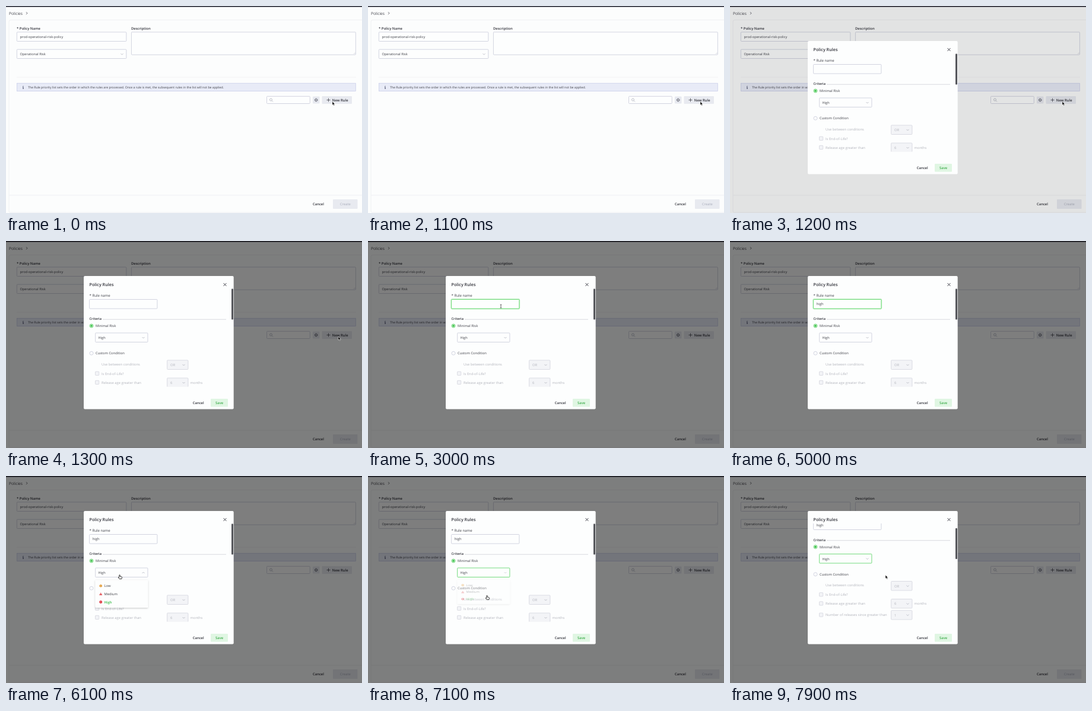
Recreate the animation shown at these times as an HTML page. Size 600x349 px, loop 8 s.

```html
<!DOCTYPE html>
<html lang="en">
<head>
<meta charset="utf-8">
<title>Policy rule form</title>
<style>
  html, body { margin: 0; width: 100%; height: 100%; overflow: hidden; background: #fcfdfd; }
  svg { display: block; width: 600px; height: 349px; }
  text { font: 5.65px "Open Sans", "Noto Sans", sans-serif; fill: #41424a; text-rendering: geometricPrecision; }
  .label { font-size: 5.9px; font-weight: 600; fill: #303139; }
  .option { font-size: 5.8px; font-weight: 500; }
  .off text { font-size: 5.8px; fill: #b3b5bd; }
  .box { fill: #fdfefe; stroke: #c8cbda; stroke-width: .8; }
  .off .box { fill: #f3f4f7; stroke: #d3d5de; }
  .line { fill: none; stroke: #c9cad3; stroke-width: .7; }
  .icon { fill: none; stroke: #44454e; stroke-width: .8; }
  .chevron { fill: none; stroke: #a6a9b5; stroke-width: .7; }
</style>
</head>
<body>
<svg viewBox="0 0 600 349">
  <defs>
    <path id="chevron" class="chevron" d="M-2-1 0 1 2-1"/>
    <clipPath id="view"><rect x="131" y="80" width="252" height="165.5"/></clipPath>
    <filter id="shadow" x="-20%" y="-20%" width="140%" height="150%">
      <feDropShadow dx="0" dy="1" stdDeviation="1.8" flood-opacity=".22"/>
    </filter>
  </defs>

  <g id="page">
    <rect width="600" height="349" fill="#fcfdfd"/>
    <rect width="600" height="1.5" fill="#171724"/>
    <text x="5" y="14.5" style="font-size:6.6px">Policies</text>
    <path class="icon" d="M34 10.2l2 2-2 2"/>
    <path d="M600 23.5H8q-3 0-3 3V346q0 2 2 2h593M5 319H600" fill="none" stroke="#eff0f3" stroke-width="1"/>
    <text class="label" x="18" y="39.7">* Policy Name</text>
    <text class="label" x="211" y="39.7">Description</text>
    <rect class="box" x="18.3" y="44" width="184.5" height="15.5" rx="1"/>
    <text x="23.5" y="53.8">prod-operational-risk-policy</text>
    <rect class="box" x="18.3" y="73.2" width="184.5" height="15.3" rx="1"/>
    <text x="23.5" y="83">Operational Risk</text>
    <use href="#chevron" x="195.5" y="81.2"/>
    <rect class="box" x="211.4" y="44" width="178" height="38.2" rx="1" style="width:378px"/>
    <path class="line" d="M586 81l2.500-2.500M588 81l.7-.7"/>
    <path d="M18 120H590" stroke="#eeeff2" stroke-width=".8"/>
    <rect x="18.3" y="130.200" width="571" height="13.300" fill="#e8ebf7" stroke="#c5cbe8" stroke-width=".7"/>
    <path d="M29 134.600v1M29 136.400v2.700M28 136.400h1M28 139.100h2" fill="none" stroke="#363a58" stroke-width=".8"/>
    <text x="37" y="138.900" style="font-size:5.15px">The Rule priority list sets the order in which the rules are processed. Once a rule is met, the subsequent rules in the list will not be applied.</text>
    <rect class="box" x="439.500" y="152.300" width="72.800" height="12.200" rx="1"/>
    <path class="chevron" d="M448 159.500l2 2M448.500 158a2 2 0 1 1-4 0a2 2 0 1 1 4 0"/>
    <rect x="517" y="152.500" width="11.500" height="12" rx="1" fill="#e7e9f0"/>
    <circle cx="522.700" cy="158.500" r="2.300" fill="none" stroke="#555864" stroke-width="1" stroke-dasharray="1.300 .5"/>
    <circle cx="522.700" cy="158.500" r="1.500" fill="none" stroke="#555864" stroke-width=".7"/>
    <rect x="532.500" y="152" width="50.500" height="13" rx="1" fill="#e8eaf0"/>
    <path class="icon" d="M540.500 158.500h6M543.500 155.500v6"/>
    <text class="label" x="549.800" y="160.600">New Rule</text>
    <text class="label" x="517" y="336">Cancel</text>
    <rect x="551" y="326" width="41.500" height="16" rx="1" fill="#e8eaf0"/>
    <text class="option" x="563" y="336" style="fill:#a9adbb">Create</text>
  </g>
  <rect id="shade" width="600" height="349"/>

  <g id="modal">
    <rect x="131" y="59" width="252.700" height="224.500" rx="2" fill="#fdfefe"/>
    <text class="label" x="140.500" y="76.400" style="font-size:7.2px">Policy Rules</text>
    <path class="icon" d="M366.500 71l5 5m0-5l-5 5" style="stroke-width:1"/>
    <g clip-path="url(#view)">
      <g id="content">
        <text class="option" x="140.500" y="94.200" style="font-size:6.100px">* Rule name</text>
        <rect id="glow" x="140" y="97.900" width="115.500" height="16.700" rx="1.500" fill="none" stroke="#bdf0c0" stroke-width="1.300"/>
        <rect id="field" class="box" x="140.600" y="98.500" width="114.300" height="15.500" rx="1"/>
        <text id="typed" x="145.700" y="108.200" style="font-size:5.800px"></text>
        <path id="caret" d="M0 103v7" stroke="#333" stroke-width=".6"/>
        <text class="label" x="140.500" y="133.300" style="font-size:5.700px">Criteria</text>
        <path class="line" d="M163 132.200H371"/>
        <circle cx="144" cy="143" r="3" fill="#d9f8da" stroke="#56cf61" stroke-width=".8"/>
        <circle cx="144" cy="143" r="1.700" fill="#36bd45"/>
        <text class="option" x="151" y="145.200">Minimal Risk</text>
        <rect id="select" class="box" x="150.600" y="155" width="88.300" height="15.500" rx="1"/>
        <text x="155.500" y="165">High</text>
        <use id="arrow" href="#chevron"/>
        <circle class="box" cx="144" cy="189.200" r="3"/>
        <text class="option" x="151" y="191.300">Custom Condition</text>
        <g class="off">
          <text x="161" y="209.500">Use between conditions</text>
          <rect class="box" x="271.600" y="201" width="35.300" height="15.500" rx="1"/>
          <text x="277" y="211">OR</text>
          <use href="#chevron" x="299.500" y="209"/>
          <rect class="box" x="150.500" y="220.200" width="6.200" height="6.200" rx=".7"/>
          <text x="161" y="225.500">Is End-of-Life?</text>
          <rect class="box" x="150.500" y="235.300" width="6.200" height="6.200" rx=".7"/>
          <text x="161" y="240.600">Release age greater than</text>
          <rect class="box" x="271.600" y="231" width="35.300" height="15.300" rx="1"/>
          <text x="277" y="240.800">6</text>
          <use href="#chevron" x="299.500" y="239"/>
          <text x="310.500" y="240.600">months</text>
          <rect class="box" x="150.500" y="254.500" width="6.200" height="6.200" rx=".7"/>
          <text x="161" y="259.800">Number of releases since greater than</text>
          <rect class="box" x="271.600" y="250.200" width="35.300" height="15.300" rx="1"/>
          <text x="277" y="260">1</text>
          <use href="#chevron" x="299.500" y="258"/>
        </g>
      </g>
    </g>
    <rect id="thumb" x="380" width="3" height="52" rx="1" fill="#55565b"/>
    <text class="label" x="314.800" y="274.700">Cancel</text>
    <rect x="345" y="266" width="29" height="13.500" rx="1" fill="#e0f6e3"/>
    <text class="label" x="353" y="274.700" style="fill:#3fae4d">Save</text>
    <g id="menu">
      <rect x="150.500" y="175.500" width="88.700" height="46.500" rx="1" fill="#fdfefe" filter="url(#shadow)"/>
      <circle cx="159.700" cy="185.300" r="2.300" fill="#e39a35"/>
      <path d="M159.700 196.500l2.600 4.600h-5.200z" fill="#e0474c"/>
      <circle cx="159.700" cy="212.500" r="2.400" fill="#dc2f3a"/>
      <path d="M159.700 184v1.500m0 .5v.7M159.700 198v1.400m0 .4v.6M159.700 211v1.700m0 .5v.7" stroke="#fff" stroke-width=".6"/>
      <text class="option" x="165.500" y="187.200">Low</text>
      <text class="option" x="165.500" y="200.900">Medium</text>
      <text class="option" x="165.500" y="214.600" style="font-weight:600;fill:#3cbd4a">High</text>
    </g>
  </g>

  <g id="pointer" stroke="#fff" stroke-width=".5">
    <path id="pick" d="M0 0v6l1.400-1.200 1 2.200 1.100-.5-1-2.100h1.900z"/>
    <path id="beam" d="M-1.200-3q1.200 0 1.200.8v4.400q0 .8-1.200.8M1.200-3Q0-3 0-2.200M0 2.200q0 .8 1.200.8" fill="none" stroke="#222" stroke-width=".7"/>
    <path id="hand" d="M-.7 0q.7-.8 1.400 0v2.300l2.600.5q.8.300.7 1.200L3.400 6.500H-.5L-2.400 4q.2-1 1.700 0z" fill="#fff" stroke="#111" stroke-width=".8"/>
  </g>
</svg>
<script>
const LOOP = 8000, STEP = 100;
const el = {};
document.querySelectorAll('[id]').forEach(node => el[node.id] = node);

const ramp = (t, from, to) => Math.min(1, Math.max(0, (t - from) / (to - from)));
const ease = p => p * p * (3 - 2 * p);
const show = (node, on) => node.setAttribute('visibility', on ? 'inherit' : 'hidden');
const within = (t, from, to) => t >= from && t < to;
const move = (node, x, y) => node.setAttribute('transform', `translate(${x} ${y})`);
const border = p => `rgb(${200 - 118 * p},${203 + 7 * p},${218 - 124 * p})`;

// Moves of the pointer: start time, end time, x, y
const moves = [
  [400, 1000, 560, 161], [1600, 2200, 224, 110], [5100, 5600, 191.5, 167],
  [6100, 6700, 179, 214], [6900, 7500, 262, 167]
];
const keys = [[3900, 'h'], [4200, 'hi'], [4400, 'hig'], [4500, 'high']];

function drawPointer(t) {
  let x = 550, y = 161;
  for (const [from, to, toX, toY] of moves) {
    const p = ease(ramp(t, from, to));
    x += (toX - x) * p;
    y += (toY - y) * p;
  }
  move(el.pointer, x, y);
  const beam = within(t, 2100, 5300), hand = within(t, 5500, 7200);
  show(el.pointer, !within(t, 3900, 5200));
  show(el.beam, beam);
  show(el.hand, hand);
  show(el.pick, !beam && !hand);
}

function drawField(t) {
  const blur = 1 - ramp(t, 5700, 5900);
  const focus = ramp(t, 2400, 2700) * blur;
  el.field.style.stroke = border(t < 2200 ? 0 : Math.max(.4 * blur, focus));
  el.glow.setAttribute('opacity', focus);
  const typed = keys.filter(([time]) => t >= time).pop();
  el.typed.textContent = typed ? typed[1] : '';
  move(el.caret, 146 + (typed ? el.typed.getComputedTextLength() : 0), 0);
  show(el.caret, within(t, 2500, 3000) || within(t, 3500, 5000) || within(t, 5500, 5800));
}

function drawSelect(t) {
  const open = ramp(t, 5700, 6000) * (1 - ramp(t, 6900, 7200));
  el.menu.setAttribute('opacity', open);
  el.menu.setAttribute('transform', `translate(0 175) scale(1 ${.8 + .2 * open}) translate(0 -175)`);
  el.arrow.setAttribute('transform', `translate(231.500 163) scale(1 ${1 - 2 * open})`);
  el.select.style.stroke = border(ramp(t, 6800, 7100));
}

function draw(t) {
  show(el.modal, t >= 1200);
  el.shade.setAttribute('opacity', t < 1200 ? 0 : t < 1300 ? .1 : .5);
  const scroll = t < 7800 ? 0 : t < 7900 ? .45 : 1;
  move(el.content, 0, -23.5 * scroll);
  el.thumb.setAttribute('y', 80.5 + 7.5 * scroll);
  drawField(t);
  drawSelect(t);
  drawPointer(t);
}

function tick() {
  draw(Math.floor(performance.now() % LOOP / STEP) * STEP);
  requestAnimationFrame(tick);
}
tick();
</script>
</body>
</html>
```
